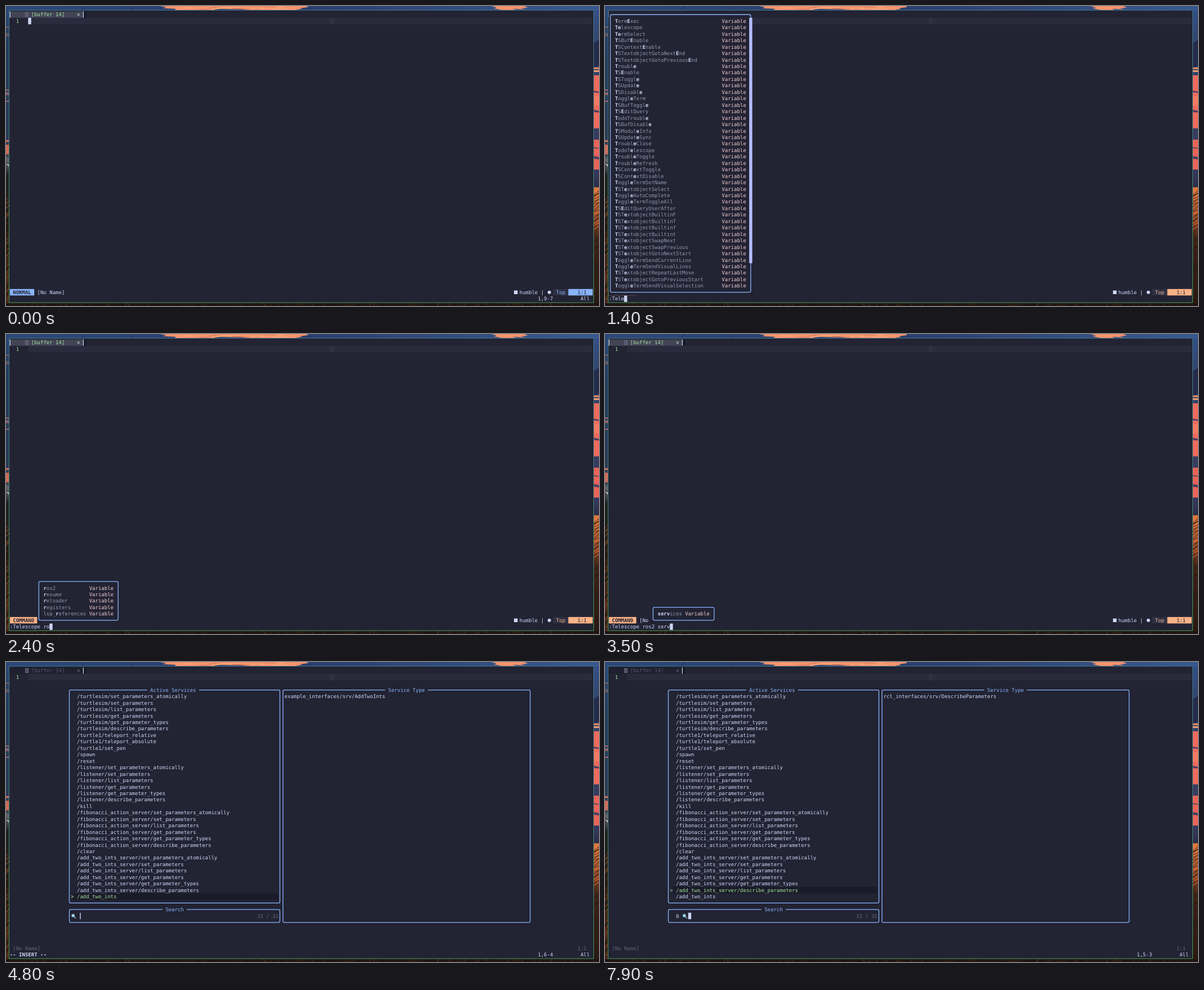
Recreate the animation shown at these times as an HTML page with a canvas. Size 1053 by 532 pixels, loop 8000 ms.

```html
<!DOCTYPE html>
<html lang="en">
<head>
<meta charset="utf-8">
<title>Service picker</title>
<style>
html, body { margin: 0; width: 100%; height: 100%; overflow: hidden; background: #222333; }
canvas { display: block; }
</style>
</head>
<body>
<canvas id="stage" width="1053" height="532"></canvas>
<script>
const W = 1053, H = 532, LOOP = 8000;
const CELL = 5.419, ROW = 11.45, LEFT = 6.8, TOP = 9.5;
const BASE = '#222333', TEXT = '#cdd6f4', DIM = '#9197ae', FAINT = '#62657a', BLUE = '#89b4fa',
  PEACH = '#fab387', GREEN = '#a6e3a1', PINK = '#f2cdcd', LINE = '#2a2b3c', DARK = '#191a28';
const ctx = document.getElementById('stage').getContext('2d');
const colX = c => LEFT + c * CELL;
const rowY = r => TOP + r * ROW;

function cells(col, row, width, color, height = 1) {
  ctx.fillStyle = color;
  ctx.fillRect(colX(col), rowY(row), width * CELL, height * ROW);
}

function write(text, col, row, color = TEXT, bold = false) {
  ctx.font = (bold ? 'bold ' : '') + '9px "DejaVu Sans Mono", monospace';
  ctx.fillStyle = color;
  ctx.fillText(text, colX(col), rowY(row) + 8.9);
}

// Box drawn through the centres of its border cells.
function frame(c0, r0, c1, r1) {
  cells(c0, r0, c1 - c0 + 1, BASE, r1 - r0 + 1);
  ctx.strokeStyle = BLUE;
  ctx.lineWidth = 1.3;
  ctx.beginPath();
  ctx.roundRect(colX(c0 + .5), rowY(r0 + .5), (c1 - c0) * CELL, (r1 - r0) * ROW, 2.5);
  ctx.stroke();
}

function panel(c0, r0, c1, r1, title, titleCol) {
  frame(c0, r0, c1, r1);
  cells(titleCol - 1, r0, title.length + 2, BASE);
  write(title, titleCol, r0, BLUE);
}

function dot(x, y, radius, color) {
  ctx.fillStyle = color;
  ctx.beginPath();
  ctx.arc(x, y, radius, 0, 7);
  ctx.fill();
}

/* Wallpaper */

function paintWallpaper() {
  const canvas = document.createElement('canvas');
  canvas.width = W;
  canvas.height = H;
  const g = canvas.getContext('2d');
  let seed = 7;
  const rnd = () => (seed = seed * 16807 % 2147483647) / 2147483647;
  const rect = (x, y, w, h, color) => { g.fillStyle = color; g.fillRect(x, y, w, h); };
  const shape = (color, ...p) => {
    g.fillStyle = color;
    g.beginPath();
    for (let i = 0; i < p.length; i += 2) g.lineTo(p[i], p[i + 1]);
    g.fill();
  };
  const fade = (x, w, ...stops) => {
    const grad = g.createLinearGradient(0, 0, 0, H);
    stops.forEach(([y, color]) => grad.addColorStop(y / H, color));
    rect(x, 0, w, H, grad);
  };

  fade(0, 520, [0, '#2d4a78'], [60, '#223d60'], [230, '#283a55'], [285, '#4a464e'],
    [300, '#1f2320'], [400, '#22190f'], [532, '#3a2216']);
  fade(520, 533, [0, '#34528a'], [60, '#33466f'], [110, '#39436a'], [300, '#35365a'],
    [321, '#2c2c48'], [322, '#e0793f'], [385, '#b5552d'], [410, '#3c2418'], [532, '#2c1a13']);
  const sky = g.createLinearGradient(0, 0, W, 0);
  sky.addColorStop(0, '#2b4878');
  sky.addColorStop(.5, '#2b3f6c');
  sky.addColorStop(1, '#38588e');
  rect(0, 0, W, 8, sky);

  shape('#f4946c', 273, 0, 284, 2, 280, 4, 302, 5, 298, 8, 508, 8, 526, 5, 522, 4, 536, 2, 535, 0);
  shape('#f4946c', 862, 0, 872, 3, 866, 4, 884, 8, 908, 8, 900, 5, 922, 6, 914, 4, 927, 3, 920, 0);
  for (let i = 0; i < 24; i++) {
    const x = 300 + rnd() * 200;
    rect(x, 1 + rnd() * 6, 8 + rnd() * 16, 1, i % 2 ? '#d97862' : '#ffaf83');
  }
  shape('#34466e', 362, 8, 380, 5, 420, 6, 440, 8);
  g.strokeStyle = '#1c2c48';
  for (const x of [135, 222]) {
    g.beginPath();
    g.moveTo(x, 8);
    g.lineTo(x + 7, 0);
    g.stroke();
  }

  // left strip
  for (const [y, h, color] of [[36, 3, '#695564'], [48, 6, '#5e5364'], [148, 2, '#a66a6c'],
    [153, 5, '#8d626a'], [168, 2, '#a56567'], [238, 3, '#d4705f'], [246, 17, '#cf6b58'],
    [268, 9, '#606066']]) rect(0, y, 5, h, color);
  shape('#c4bcb0', 0, 279, 5, 281, 5, 285);

  // right strip
  shape('#252c4b', 1044, 66, 1053, 60, 1053, 106, 1044, 109);
  rect(1044, 109, 9, 3, '#e88762');
  rect(1044, 114, 9, 3, '#f0a070');
  rect(1044, 123, 9, 94, '#ee6b5d');
  rect(1044, 237, 9, 53, '#e96459');
  for (const [y, h] of [[150, 4], [184, 5], [222, 2], [250, 3], [266, 6]])
    shape('#4a3e60', 1044, y, 1053, y + 2, 1053, y + h, 1044, y + h - 1);
  rect(1044, 160, 9, 16, '#f37a63');

  // grass
  for (let i = 0; i < 110; i++) {
    const y = 335 + rnd() * 195, right = i % 2;
    g.strokeStyle = ['#6d3a1e', '#2a1a12', '#8a4a22', '#1b1512'][i % 4];
    g.lineWidth = .8;
    g.beginPath();
    g.moveTo(right ? 1044 : 0, y);
    g.lineTo(right ? 1053 : 5, y - 3 - rnd() * 6);
    g.stroke();
  }
  rect(0, 527, W, 5, '#1f1512');
  for (let i = 0; i < 150; i++) {
    const x = rnd() * W;
    g.strokeStyle = ['#4a2a18', '#140f0e', '#5f3419'][i % 3];
    g.beginPath();
    g.moveTo(x, 532);
    g.lineTo(x + rnd() * 16 - 8, 526);
    g.stroke();
  }
  return canvas;
}
const wallpaper = paintWallpaper();

/* Content */

const commands = `TermExec Telescope TermSelect TSBufEnable TSContextEnable TSTextobjectGotoNextEnd
TSTextobjectGotoPreviousEnd Trouble TSEnable TSToggle TSUpdate TSDisable ToggleTerm TSBufToggle
TSEditQuery TodoTrouble TSBufDisable TSModuleInfo TSUpdateSync TroubleClose TodoTelescope
TroubleToggle TroubleRefresh TSContextToggle TSContextDisable ToggleTermSetName TSTextobjectSelect
ToggleAutoComplete ToggleTermToggleAll TSEditQueryUserAfter TSTextobjectBuiltinF
TSTextobjectBuiltinT TSTextobjectBuiltinf TSTextobjectBuiltint TSTextobjectSwapNext
TSTextobjectSwapPrevious TSTextobjectGotoNextStart ToggleTermSendCurrentLine
ToggleTermSendVisualLines TSTextobjectRepeatLastMove TSTextobjectGotoPreviousStart
ToggleTermSendVisualSelection`.split(/\s+/);
const byLength = list => [...list].sort((a, b) => a.length - b.length);
const pickers = byLength(`live_grep grep_string find_files fd treesitter current_buffer_fuzzy_find
tags current_buffer_tags git_files git_commits git_bcommits git_branches git_status git_stash
builtin resume pickers planets symbols commands quickfix quickfixhistory loclist oldfiles
command_history search_history vim_options help_tags man_pages reloader buffers colorscheme marks
registers keymaps filetypes highlights autocommands spell_suggest tagstack jumplist lsp_references
lsp_definitions diagnostics ros2`.split(/\s+/));

const params = node => ['set_parameters_atomically', 'set_parameters', 'list_parameters',
  'get_parameters', 'get_parameter_types', 'describe_parameters'].map(s => `/${node}/${s}`);
const services = [...params('turtlesim'), '/turtle1/teleport_relative',
  '/turtle1/teleport_absolute', '/turtle1/set_pen', '/spawn', '/reset', ...params('listener'),
  '/kill', ...params('fibonacci_action_server'), '/clear', ...params('add_two_ints_server'),
  '/add_two_ints'];

const menu = (items, col, width, bar = 0) => ({ items, col, width, bar });
const allT = menu(byLength(commands), 0, 34, 38);
const te = menu(commands, 0, 34, 38);
const tele = menu(['Telescope', 'TodoTelescope'], 0, 13);
const allPickers = menu(pickers.slice(0, 42), 9, 29, 33);
const rPickers = menu(['ros2', 'resume', 'reloader', 'registers', 'lsp_references'], 9, 14);
const ros = menu(['ros2'], 9, 4);
const kinds = menu(['nodes', 'topics', 'actions', 'services', 'interfaces'], 14, 10);
const serv = menu(['services'], 14, 8);

// time, typed command, completion menu, highlighted query
const typing = [
  [600, ''], [1000, 'T'], [1100, 'Te', allT, 'T'], [1300, 'Tel', te, 'Te'],
  [1400, 'Tele', te, 'Te'], [1500, 'Tele', tele, 'Tele'], [1600, 'Teles', tele, 'Teles'],
  [1700, 'Telesc', tele, 'Telesc'], [1800, 'Telesco', tele, 'Telesco'],
  [1900, 'Telescop', tele, 'Telescop'], [2000, 'Telescope', tele, 'Telescop'],
  [2100, 'Telescope', tele, 'Telescope'], [2200, 'Telescope '],
  [2300, 'Telescope r', allPickers, ''], [2400, 'Telescope ro', rPickers, 'r'],
  [2600, 'Telescope ros', ros, 'ros'], [2800, 'Telescope ros2', ros, 'ros2'],
  [2900, 'Telescope ros2 '], [3000, 'Telescope ros2 ', kinds, ''],
  [3100, 'Telescope ros2 s', kinds, ''], [3200, 'Telescope ros2 se', serv, 's'],
  [3300, 'Telescope ros2 ser', serv, 'se'], [3400, 'Telescope ros2 serv', serv, 'ser'],
  [3500, 'Telescope ros2 serv', serv, 'serv'], [3600, 'Telescope ros2 servi', serv, 'servi'],
  [3700, 'Telescope ros2 servic', serv, 'servic'], [3800, 'Telescope ros2 service', serv, 'service'],
  [3900, 'Telescope ros2 services', serv, 'services'], [4000, 'Telescope ros2 services']
];

/* Parts of the editor */

// Fuzzy match that prefers a capital at a word start.
function matches(word, query) {
  const hits = new Set();
  let at = -1;
  for (const ch of query) {
    const capital = word.indexOf(ch.toUpperCase(), at + 1);
    at = capital >= 0 ? capital : word.indexOf(ch, at + 1);
    hits.add(at);
  }
  return hits;
}

function drawMenu({ items, col, width, bar }, query) {
  const top = 43 - items.length, right = col + width + 12;
  frame(col, top - 1, right, 43);
  items.forEach((word, i) => {
    const hits = matches(word, query);
    [...word].forEach((ch, k) =>
      write(ch, col + 2 + k, top + i, hits.has(k) ? TEXT : DIM, hits.has(k)));
    write('Variable', col + 3 + width, top + i, PINK);
  });
  if (bar) cells(right, 1, 1, '#b4befe', bar);
}

function drawTab(active) {
  cells(0, 0, 24.2, active ? '#424456' : '#1f2030');
  cells(24.3, 0, .8, DARK);
  ctx.fillStyle = TEXT;
  if (active) ctx.fillRect(6.6, 9.6, 1.3, 10.8);
  ctx.fillRect(136.8, 9.6, 1.2, 10.8);
  ctx.strokeStyle = active ? '#74778a' : '#8a8da0';
  ctx.lineWidth = 1;
  ctx.strokeRect(34.7, 12, 4.6, 6.4);
  ctx.beginPath();
  ctx.moveTo(36, 14.3);
  ctx.lineTo(38.2, 14.3);
  ctx.moveTo(36, 16.3);
  ctx.lineTo(38.2, 16.3);
  ctx.stroke();
  write('[buffer 14]', 7, 0, active ? GREEN : '#54576b');
  write('✕', 22, 0, active ? '#d5f0d3' : '#777a8c', active);
}

function drawStatus(mode, color) {
  const width = mode.length + 2;
  cells(0, 43, width, color);
  write(mode, 1, 43, '#1e1e2e', true);
  write('[No Name]', width + 1, 43);
  ctx.fillStyle = TEXT;
  ctx.fillRect(902, 504.5, 6.5, 6.5);
  write('humble |', 167, 43);
  dot(964.8, 507.8, 3, TEXT);
  cells(178, 43, 5, '#2d2f42');
  write('Top', 179, 43, color);
  cells(183, 43, 8, color);
  write('1:1', 186, 43, '#1e1e2e');
}

function drawRuler(position) {
  write(position, 173, 44);
  write('All', 187, 44);
}

function drawLens(col) {
  const x = colX(col) + 4, y = rowY(38) + 5.2;
  ctx.strokeStyle = '#8b98a5';
  ctx.lineWidth = 1.7;
  ctx.beginPath();
  ctx.moveTo(x + 2, y + 2);
  ctx.lineTo(x + 4.8, y + 4.8);
  ctx.stroke();
  dot(x, y, 3.2, '#5c8499');
  dot(x, y, 2.3, '#a9d9f2');
}

function drawPicker(t) {
  const insert = t < 6700, picked = t < 7400 ? 31 : 30;
  write('[No Name]', 1, 43, FAINT);
  write('1:1', 186, 43, FAINT);
  if (insert) write('-- INSERT --', 0, 44, TEXT, true);
  drawRuler(insert ? '1,6-4' : '1,5-3');

  panel(19, 3, 88, 36, 'Active Services', 46);
  cells(21, 4 + picked, 67, '#1a1b28');
  services.forEach((name, i) => write(name, 22, 4 + i, i === picked ? GREEN : TEXT));
  write('>', 20, 4 + picked, GREEN);

  panel(19, 37, 88, 39, 'Search', 51);
  write('32 / 32', 81, 38, FAINT);
  if (insert) {
    drawLens(20);
    ctx.fillStyle = TEXT;
    ctx.fillRect(131.2, rowY(38), 1.4, ROW);
  } else {
    write('0', 22, 38);
    drawLens(24);
    cells(26, 38, 1, TEXT);
  }

  panel(89, 3, 170, 39, 'Service Type', 124);
  if (t >= 4800 && t < 7400) write('example_interfaces/srv/AddTwoInts', 90, 4);
  if (t >= 7900) write('rcl_interfaces/srv/DescribeParameters', 90, 4);
}

function drawWindow() {
  ctx.drawImage(wallpaper, 0, 0);
  ctx.fillStyle = BASE;
  ctx.fillRect(5, 7.5, 1039, 519);
  const edge = ctx.createLinearGradient(0, 8, 0, 526);
  edge.addColorStop(0, '#41768a');
  edge.addColorStop(1, '#3f9a5c');
  ctx.strokeStyle = edge;
  ctx.lineWidth = 1;
  ctx.strokeRect(5.5, 7.5, 1038, 518.5);
  cells(6, 1, 185, LINE);
  cells(105, 1, 1, '#313244');
  write('1', 2, 1, GREEN);
}

function draw(t) {
  ctx.textRendering = 'geometricPrecision';
  drawWindow();
  drawTab(t < 4400);
  if (t < 600) {
    cells(6, 1, 1, TEXT);
    drawStatus('NORMAL', BLUE);
    drawRuler('1,9-7');
  } else if (t < 4400) {
    const [, typed, list, query] = typing.filter(step => step[0] <= t).pop();
    drawStatus('COMMAND', PEACH);
    write(':' + typed, 0, 44);
    cells(typed.length + 1, 44, 1, TEXT);
    if (list) drawMenu(list, query);
  } else {
    drawPicker(t);
  }
}

const start = performance.now();
function tick() {
  draw((performance.now() - start) % LOOP);
  requestAnimationFrame(tick);
}
tick();
</script>
</body>
</html>
```
